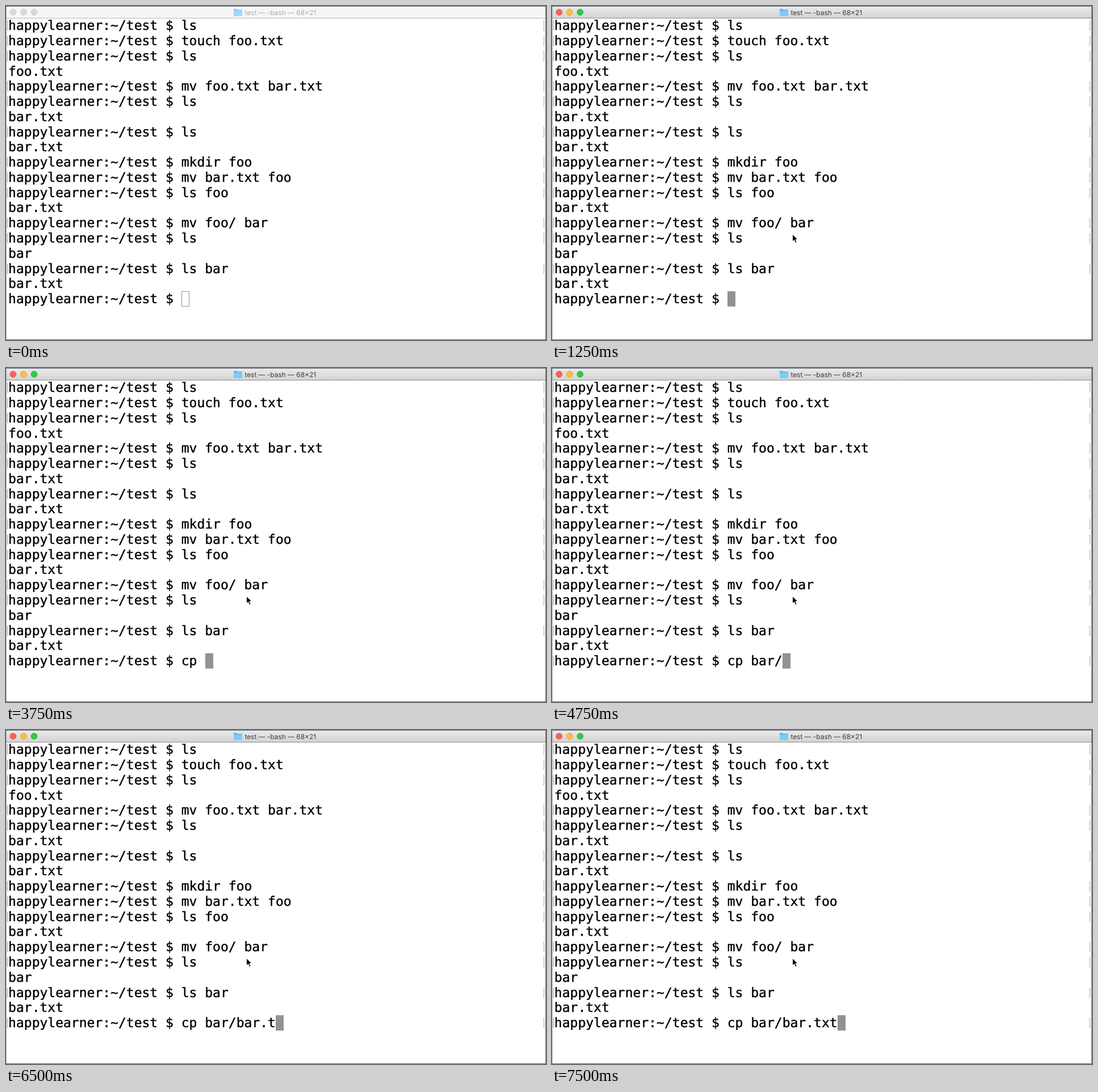
Recreate the animation shown at these times as an HTML page. Size 951 px wide and 589 px high, loop 8 s.

```html
<!DOCTYPE html>
<html lang="en">
<head>
<meta charset="utf-8">
<title>Terminal session</title>
<style>
  html, body { margin: 0; width: 100%; height: 100%; overflow: hidden; background: #fff; }
  svg { display: block; }
  text { text-rendering: geometricPrecision; white-space: pre; }
  #screen text { font: 23px "DejaVu Sans Mono", monospace; stroke: #000; stroke-width: .4px; }
  #title { font: 11.9px Inter, sans-serif; fill: #3c3c3c; }
  #bar { fill: url(#chrome); }
  #rule { fill: #8f8f8f; }
  #cursor { fill: #929292; stroke: #929292; }
  .mark { fill: none; stroke: #a6a6a6; }
  .inactive #bar { fill: #f6f6f6; }
  .inactive #rule { fill: #b8b8b8; }
  .inactive #title { fill: #adadad; }
  .inactive #folder { opacity: .7; }
  .inactive #lights circle { fill: #d9d9d9; stroke: #c8c8c8; }
  .inactive #cursor { fill: #fff; }
</style>
</head>
<body>
<svg id="stage" width="951" height="589" viewBox="0 0 951 589">
  <defs>
    <linearGradient id="chrome" x2="0" y2="1">
      <stop stop-color="#ebebeb"/>
      <stop offset="1" stop-color="#d2d2d2"/>
    </linearGradient>
  </defs>
  <rect width="951" height="589" fill="#fff"/>
  <rect id="bar" width="951" height="22"/>
  <rect id="rule" y="21" width="951" height="1"/>
  <g id="lights" stroke-width=".8">
    <circle cx="12.5" cy="11" r="5.4" fill="#fc605b" stroke="#e0443e"/>
    <circle cx="31" cy="11" r="5.4" fill="#fdbc40" stroke="#dea123"/>
    <circle cx="49.5" cy="11" r="5.4" fill="#34c84a" stroke="#1aab29"/>
  </g>
  <g id="folder">
    <path d="M401 18V6q0-1 1-1h4l1.500 1.500H415q1 0 1 1V18z" fill="#5db9ea"/>
    <path d="M401 8.500h15V18h-15z" fill="#7ccdf8"/>
  </g>
  <text id="title" x="483.200" y="15.500" text-anchor="middle">test — -bash — 68×21</text>
  <g id="screen"></g>
  <path id="pointer" d="M.5 .5V13.500L3.500 10.700 5.700 15.700 8 14.700 5.900 9.800H10z" fill="#000" stroke="#fff"/>
  <path d="M0 .5H951M950.500 0V589M0 588.500H951" stroke="#56616d"/>
  <path d="M.5 1V588" stroke="#a3a9af"/>
</svg>
<script>
const LEFT = 4.7, TOP = 21.4, CELL = 13.846, ROW = 26.77, LOOP = 8000;
const PROMPT = 'happylearner:~/test $ ';
const COMMAND = 'cp bar/bar.txt';
const HISTORY = [
  '$ls', '$touch foo.txt', '$ls', 'foo.txt', '$mv foo.txt bar.txt', '$ls', 'bar.txt',
  '$ls', 'bar.txt', '$mkdir foo', '$mv bar.txt foo', '$ls foo', 'bar.txt',
  '$mv foo/ bar', '$ls', 'bar', '$ls bar', 'bar.txt'
];
// [time, characters typed]
const TYPING = [
  [0, 0], [3000, 1], [3250, 2], [3750, 3], [4250, 4], [4500, 6], [4750, 7],
  [5500, 9], [5750, 10], [6250, 11], [6500, 12], [6750, 13], [7000, 14]
];
// [time, x, y]
const POINTER = [[0, -50, -50], [500, 414, 360], [750, 415, 388], [1000, 421, 402], [1250, 423, 402]];

const byId = id => document.getElementById(id);
const stage = byId('stage'), screen = byId('screen'), pointer = byId('pointer');

function add(name, attrs) {
  const el = document.createElementNS('http://www.w3.org/2000/svg', name);
  for (const key in attrs) el.setAttribute(key, attrs[key]);
  return screen.appendChild(el);
}

function addLine(row, content) {
  const el = add('text', { x: LEFT - 0.6, y: TOP + row * ROW + 20.85 });
  el.textContent = content;
  return el;
}

function addMarks(row) {
  const y = Math.round(TOP + row * ROW) + 5.5;
  return add('path', { class: 'mark', d: `M4 ${y}h-1.5v16h1.5M946 ${y}h1.5v16h-1.5` });
}

HISTORY.forEach((line, row) => {
  const isCommand = line[0] === '$';
  if (isCommand) addMarks(row);
  addLine(row, isCommand ? PROMPT + line.slice(1) : line);
});

const cursor = add('rect', { id: 'cursor', y: 503.5, width: 13, height: 26 });
const input = addLine(HISTORY.length, PROMPT);
const inputMarks = addMarks(HISTORY.length);

const latest = (steps, t) => steps.filter(step => step[0] <= t).pop();

function draw() {
  const t = performance.now() % LOOP;
  const count = latest(TYPING, t)[1];
  const [, px, py] = latest(POINTER, t);
  input.textContent = PROMPT + COMMAND.slice(0, count);
  cursor.setAttribute('x', Math.round(LEFT + (PROMPT.length + count) * CELL) + 0.5);
  inputMarks.setAttribute('visibility', t < 4750 ? 'hidden' : 'visible');
  pointer.setAttribute('transform', `translate(${px} ${py})`);
  stage.classList.toggle('inactive', t < 1000);
  requestAnimationFrame(draw);
}
draw();
</script>
</body>
</html>
```
